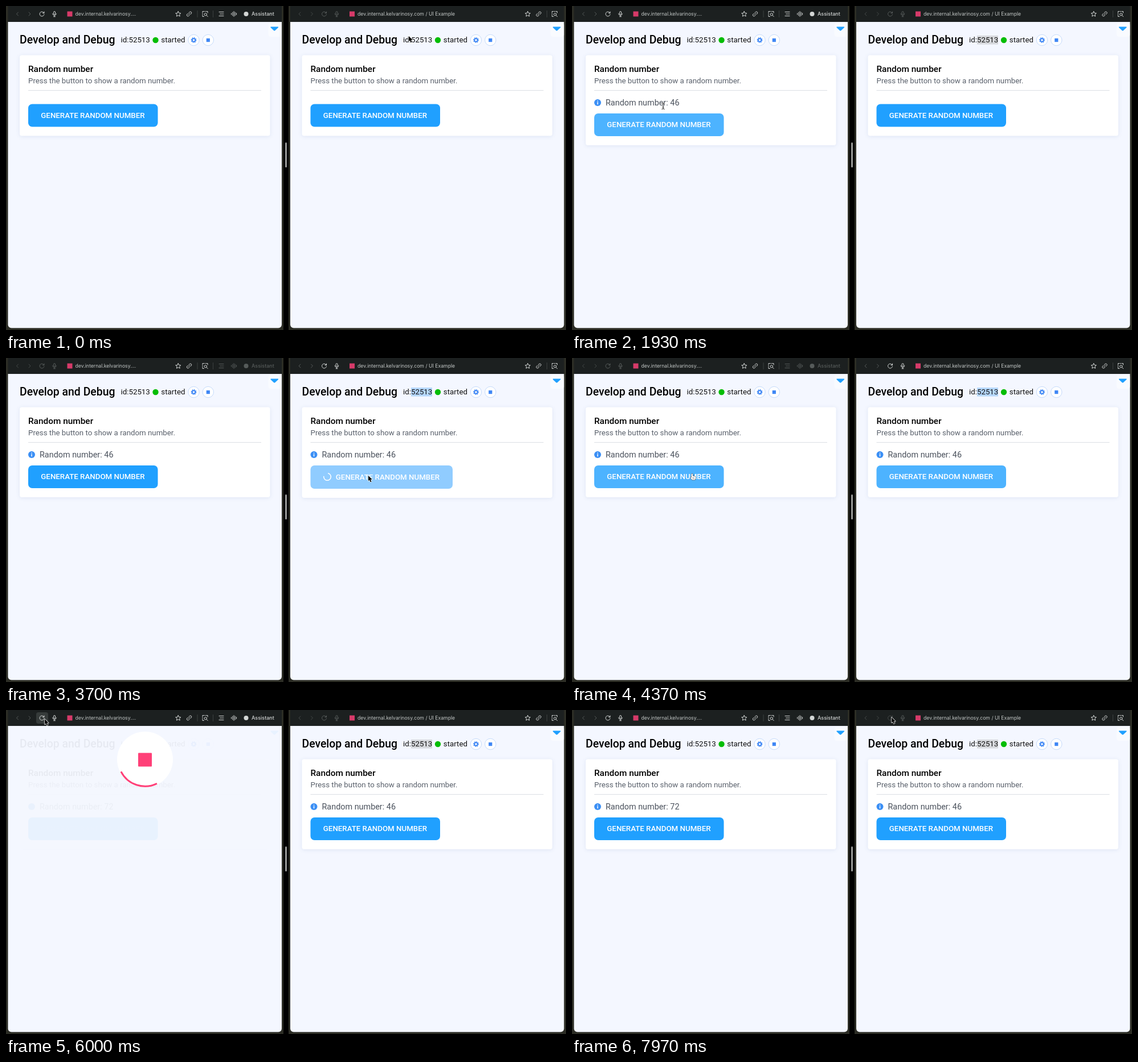
These frames come from a looping animation (983x570 px, 8000 ms). An HTML page with a canvas:

```html
<!DOCTYPE html>
<html lang="en">
<head>
<meta charset="utf-8">
<title>Random number</title>
<style>
  html, body { margin: 0; width: 100%; height: 100%; overflow: hidden; background: #2c2d25; }
  canvas { display: block; }
</style>
</head>
<body>
<canvas id="stage" width="983" height="570"></canvas>
<script>
const ctx = document.getElementById('stage').getContext('2d');
const LOOP = 8000;
const RIGHT_X = 495.5;
const BLUE = '#20a0ff', PINK = '#ff4078', BAR = '#1c2020', PAGE = '#f4f7ff';
const SANS = 'Roboto, sans-serif', UI = 'Inter, sans-serif';

// Cursor hot spot over time: [ms, x, y]
const PATH = [
  [0, 707, 53], [130, 725, 58], [330, 728, 60], [600, 816, 110], [830, 757, 163],
  [1350, 160, 176], [1980, 160, 176], [2260, 812, 165], [2460, 640, 202], [2700, 636, 207],
  [3800, 636, 207], [4150, 110, 150], [4400, 215, 205], [5480, 215, 205], [5780, 68, 16],
  [6250, 68, 16], [6700, 150, 148], [7000, 158, 157], [7150, 158, 157], [7390, 742, 172],
  [7520, 666, 166], [7830, 561, 13], [8000, 561, 13]
];
const FOCUS = [[0, 'left'], [120, 'right'], [1440, 'left'], [2490, 'right'], [4480, 'left']];
const RELOAD = 5880, LOADED = 7170;
const WINDOWS = {
  left: {
    x: 0,
    numbers: [[0, 0], [1800, 46], [4780, 41], [5340, 72]],
    busy: [[1480, 1860], [4540, 4860], [5110, 5400]],
    pressed: [[1440, 2490], [4480, RELOAD]]
  },
  right: {
    x: RIGHT_X,
    numbers: [[0, 0], [2960, 46]],
    busy: [[2560, 3790]],
    pressed: [[2490, 4480]]
  }
};

const clamp = v => Math.max(0, Math.min(1, v));
const during = (spans, t) => spans.some(([a, b]) => t >= a && t < b);
const stepAt = (steps, t) => steps.filter(s => s[0] <= t).pop()[1];

function cursorAt(t) {
  const i = PATH.findIndex(p => p[0] > t);
  const [t0, x0, y0] = PATH[i - 1], [t1, x1, y1] = PATH[i];
  const k = (t - t0) / (t1 - t0), e = k * k * (3 - 2 * k);
  return { x: x0 + (x1 - x0) * e, y: y0 + (y1 - y0) * e };
}

function box(x, y, w, h, color, radius = 0) {
  ctx.fillStyle = color;
  ctx.beginPath();
  ctx.roundRect(x, y, w, h, radius);
  ctx.fill();
}
function disc(x, y, r, color) {
  ctx.fillStyle = color;
  ctx.beginPath();
  ctx.arc(x, y, r, 0, 7);
  ctx.fill();
}
function arc(x, y, r, from, to, color, width) {
  ctx.strokeStyle = color;
  ctx.lineWidth = width;
  ctx.beginPath();
  ctx.arc(x, y, r, from, to);
  ctx.stroke();
}
function icon(x, y, d, color, width = 1) {
  ctx.save();
  ctx.translate(x, y);
  ctx.strokeStyle = color;
  ctx.lineWidth = width;
  ctx.lineCap = ctx.lineJoin = 'round';
  ctx.stroke(new Path2D(d));
  ctx.restore();
}
function text(str, x, y, size, color, weight = 400, family = SANS) {
  ctx.font = `${weight} ${size}px ${family}`;
  ctx.fillStyle = color;
  ctx.fillText(str, x, y);
}

const ICONS = {
  back: 'M1.5-3L-1.5 0 1.5 3',
  forward: 'M-1.5-3L1.5 0-1.5 3',
  reload: 'M3.6-1.8A4 4 0 1 0 4 .8M4-4V-1.5H1.5',
  mic: 'M-1.5-3A1.5 1.5 0 0 1 1.5-3V-.5A1.5 1.5 0 0 1-1.5-.5ZM-3.3-.8A3.3 3.3 0 0 0 3.3-.8M0 2.5V4.7M-1.5 4.7H1.5',
  star: 'M0-4.6L1.4-1.6 4.6-1.3 2.2.9 2.9 4.2 0 2.5-2.9 4.2-2.2.9-4.6-1.3-1.4-1.6Z',
  link: 'M-.8-2L1-3.6A2 2 0 0 1 3.8-.8L2.2.8M.8 2L-1 3.6A2 2 0 0 1-3.8.8L-2.2-.8M-1.3 1.3L1.3-1.3',
  scan: 'M-4.5-2V-4.5H-2M-.5-4.5H.5M2-4.5H4.5V-2M-4.5-.5V.5M-4.5 2V4.5H-2M3 .8A2.2 2.2 0 1 1-1.4.8 2.2 2.2 0 1 1 3 .8M2.5 2.5L4.8 4.8',
  list: 'M-4-3.5H4M-2.5 0H4M-4 3.5H4',
  wave: 'M-4.5-1V1M-2.2-3V3M0-4.5V4.5M2.2-3V3M4.5-1.5V1.5'
};

function drawToolbar(isLeft, focused, reloadHover) {
  const bright = '#d3d6d5', dim = '#565b5a';
  const active = focused ? bright : dim;
  const put = (name, x, color) => icon(x, 14, ICONS[name], color);
  box(3.5, 0, 480.5, 28, BAR);
  if (reloadHover && focused) box(53, 4, 21, 20, '#363b3a', 4);
  put('back', 20, focused ? '#555a59' : '#444948');
  put('forward', 41.5, focused ? '#555a59' : '#444948');
  put('reload', 63, reloadHover && !focused ? '#444948' : active);
  put('mic', 85, active);
  box(107.5, 9.5, 9, 9, '#d63a69');
  const address = 'dev.internal.kelvarinosy';
  text(address + (isLeft ? '....' : '.com / UI Example'), 121.5, 17.2, 8.7, '#c3c7c6', 400, UI);

  const shift = isLeft ? 0 : 118;
  put('star', 302.3 + shift, bright);
  put('link', 321.5 + shift, bright);
  box(335.5 + shift, 8, 1, 12, '#3b403f');
  put('scan', 349.5 + shift, bright);
  if (isLeft) {
    box(363, 8, 1, 12, '#3b403f');
    put('list', 378, active);
    put('wave', 400, active);
    disc(421.5, 14, 4, active);
    text('Assistant', 431, 17.2, 9, active, 500, UI);
  }
}

function roundButton(x) {
  disc(x, 60, 10, '#fff');
  arc(x, 60, 9.7, 0, 7, '#c4dafb', 1);
}

function drawHeader(selection) {
  text('Develop and Debug', 24, 66.3, 19.4, '#000', 500);
  if (selection) box(215.5, 52, 37, 15.5, selection);
  text('id:52513', 201.5, 64.2, 13.3, '#111');
  disc(262.5, 60, 5.2, '#05bd05');
  text('started', 272.3, 64.2, 13.3, '#111');

  roundButton(329.5);
  arc(329.5, 60, 2.8, 0, 7, '#3f87f5', 2);
  ctx.setLineDash([Math.PI * 4.2 / 8]);
  arc(329.5, 60, 4.2, 0, Math.PI * 2, '#3f87f5', 1.5);
  ctx.setLineDash([]);
  roundButton(354.8);
  box(351.7, 57, 6.2, 6.2, '#3f87f5');

  box(460.5, 30, 23.5, 24, 'rgba(255,255,255,.45)', 4);
  ctx.fillStyle = BLUE;
  ctx.fill(new Path2D('M465 36.5H477.5Q478.8 36.8 477.8 38L472.2 43.2Q471.2 44 470.2 43.2L464.6 38Q463.8 36.8 465 36.5Z'));
}

function drawCard(t, s) {
  ctx.save();
  ctx.shadowColor = 'rgba(80,110,170,.13)';
  ctx.shadowBlur = 7;
  ctx.shadowOffsetY = 1;
  box(24, 86.5, 439.5, (s.number ? 158.5 : 142) + (s.busy ? 1 : 0), '#fff', 4);
  ctx.restore();

  text('Random number', 39, 115.9, 15.4, '#000', 500);
  text('Press the button to show a random number.', 39, 136.3, 13.3, '#59606b');
  box(39, 148, 409, 1, '#dcdfe4');
  if (s.number) {
    disc(45, 170, 6, '#3b8ff5');
    box(44.3, 169, 1.5, 4.2, '#fff');
    box(44.3, 166.6, 1.5, 1.5, '#fff');
    text('Random number: ' + s.number, 59, 175.2, 14.4, '#4b525d');
  }

  const b = s.button;
  box(b.x, b.y, b.w, b.h, s.busy ? '#90ccff' : s.lit ? '#4db3ff' : BLUE, 7);
  const label = 'GENERATE RANDOM NUMBER';
  text(label, s.busy ? 83.3 : 61.3, b.y + (s.busy ? 25 : 24.4), 13.3, '#fff', 500);
  if (s.busy) {
    const a = (t - 3700) / 800 * Math.PI * 2;
    arc(68.5, b.y + 20, 6.3, a - 1.4, a + 3.3, '#fff', 1.5);
  }
}

function drawLoader(t) {
  disc(244, 87, 49, '#fff');
  const mid = (108 + (t - 6000) / 1030 * 432) * Math.PI / 180;
  arc(244, 87, 47.2, mid - .78, mid + .78, PINK, 3);
  const size = 22 + 2 * Math.cos((t - 6000) / 1030 * Math.PI);
  box(244 - size / 2, 87.5 - size / 2, size, size, PINK, 1);
}

function drawCursor(kind, x, y) {
  ctx.save();
  ctx.translate(x, y);
  ctx.lineJoin = 'round';
  const shape = (d, fill, stroke, width) => {
    const p = new Path2D(d);
    ctx.strokeStyle = stroke;
    ctx.lineWidth = width;
    ctx.stroke(p);
    if (fill) { ctx.fillStyle = fill; ctx.fill(p); }
  };
  if (kind === 'arrow') {
    shape('M0 0V9.3L2.1 7.4 3.8 11.2 5.5 10.4 3.9 6.8H6.8Z', '#000', '#fff', 1.4);
  } else if (kind === 'beam') {
    const d = 'M-2.5-5.5Q0-5.5 0-4Q0-5.5 2.5-5.5M0-4V4M-2.5 5.5Q0 5.5 0 4Q0 5.5 2.5 5.5M-1.3 2H1.3';
    shape(d, null, 'rgba(255,255,255,.8)', 2.2);
    shape(d, null, '#222', 1);
  } else {
    shape('M-1 1Q0-.5 1 1V4.5L4.5 5.3Q6 5.6 5.8 7.5L5 11.5H-.5L-3.2 7.5Q-3.4 6-1 7Z', '#fff', '#111', 1);
    shape('M1 7V9.5M2.8 7V9.5', null, '#333', .6);
  }
  ctx.restore();
}

function drawWindow(name, t, focusedName, cursor) {
  const win = WINDOWS[name], isLeft = name === 'left', focused = name === focusedName;
  const lx = cursor.x - win.x, ly = cursor.y;
  const inside = (x, y, w, h) => lx >= x && lx <= x + w && ly >= y && ly <= y + h;
  const number = stepAt(win.numbers, t);
  const busy = during(win.busy, t);
  const button = { x: 39, y: number ? 189 : 172.5, w: busy ? 249.5 : 227.5, h: busy ? 41 : 40 };
  const hover = inside(button.x, button.y, button.w, button.h);
  const lit = hover || during(win.pressed, t);

  ctx.save();
  ctx.translate(win.x, 0);
  drawToolbar(isLeft, focused, inside(53, 4, 21, 20));
  box(3.5, 28, 480.5, 538.5, PAGE, [0, 0, 6, 6]);

  const reloading = isLeft && t >= RELOAD && t < LOADED;
  ctx.globalAlpha = reloading ? clamp((6008 - t) / 130) : 1;
  drawHeader(!isLeft && t >= 160 ? (focused ? '#b5d7fd' : '#d6d8dc') : null);
  drawCard(t, { number, busy, button, lit });
  ctx.globalAlpha = 1;
  if (reloading) drawLoader(t);
  ctx.restore();

  if (reloading) return null;
  if (hover) return busy ? null : 'hand';
  const overText = number && inside(59, 162, 130, 19)
    || inside(39, 104, 114, 14) || inside(39, 125, 258, 14) || inside(201, 54, 51, 12);
  return overText ? 'beam' : null;
}

function draw(t) {
  box(0, 0, 983, 570, '#2c2d25');
  box(487, 0, 9, 570, '#000');
  box(490, 240, 3, 44, '#9a9b99', 1.5);
  const cursor = cursorAt(t);
  const focused = stepAt(FOCUS, t);
  const kinds = Object.keys(WINDOWS).map(name => drawWindow(name, t, focused, cursor));
  drawCursor(kinds.find(Boolean) || 'arrow', cursor.x, cursor.y);
}

const start = performance.now();
function frame() {
  draw((performance.now() - start) % LOOP);
  requestAnimationFrame(frame);
}
frame();
</script>
</body>
</html>
```
